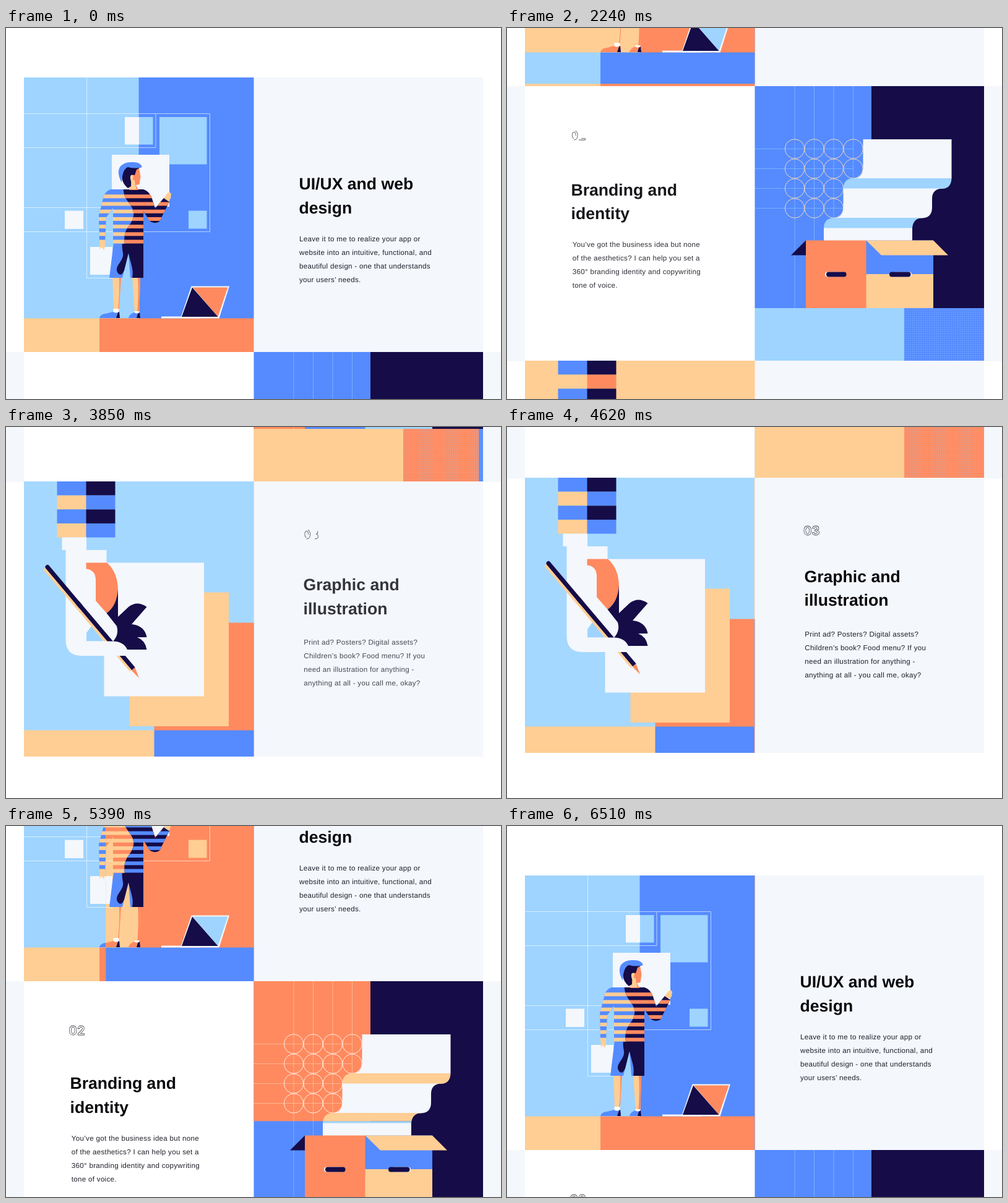
Write an HTML page with a canvas that moves like this. It is 800 px wide and 600 px high and loops after 6580 ms.

```html
<!DOCTYPE html>
<html lang="en">
<head>
<meta charset="utf-8">
<title>Services</title>
<style>
  html, body { margin: 0; height: 100%; overflow: hidden; background: #fff; }
  canvas { display: block; }
</style>
</head>
<body>
<canvas id="stage" width="800" height="600"></canvas>
<script>
const ctx = document.getElementById('stage').getContext('2d');
const LOOP = 6580, STEP = 70, PANEL_H = 444.2, HALF_W = 371;
const NAVY = '#150c48', PAPER = '#f4f7fc', SKY = '#9ed4ff', BLUE = '#558bff', PEACH = '#ffce94', ORANGE = '#ff8a5f';

// ---------- timing ----------
const clamp = v => Math.min(1, Math.max(0, v));
const span = (t, start, length) => clamp((t - start) / length);

function expo(u) {
  if (u <= 0 || u >= 1) return clamp(u);
  return u < .5 ? 2 ** (20 * u - 10) / 2 : 1 - 2 ** (10 - 20 * u) / 2;
}

// Cubic bezier (x1, 0, x2, 1), solved by bisection.
function bezier(u, x1 = .467, x2 = .128) {
  let low = 0, high = 1, s = .5;
  for (let i = 0; i < 24; i++) {
    s = (low + high) / 2;
    const r = 1 - s;
    if (3 * r * r * s * x1 + 3 * r * s * s * x2 + s ** 3 < u) low = s; else high = s;
  }
  return s * s * (3 - 2 * s);
}

// ---------- drawing helpers ----------
function rect(color, x1, y1, x2, y2) {
  ctx.fillStyle = color;
  ctx.fillRect(x1, y1, x2 - x1, y2 - y1);
}
function shape(color, d) {
  ctx.fillStyle = color;
  ctx.fill(new Path2D(d));
}
function line(color, d, width = 1) {
  ctx.strokeStyle = color;
  ctx.lineWidth = width;
  ctx.stroke(new Path2D(d));
}
function clipped(path, draw) {
  ctx.save();
  ctx.clip(path);
  draw();
  ctx.restore();
}
function palette(swapped) {
  return swapped
    ? { sky: PEACH, peach: SKY, blue: ORANGE, orange: BLUE }
    : { sky: SKY, peach: PEACH, blue: BLUE, orange: ORANGE };
}

// ---------- illustrations ----------
function drawDesigner(swapped) {
  const c = palette(swapped);
  rect(c.sky, 29, 80, 215, 470);
  rect(c.blue, 214.5, 80, 400.5, 470);
  rect(c.peach, 29, 469.5, 151, 525);
  rect(c.orange, 151, 469.5, 400.5, 525);

  rect(PAPER, 192, 144, 215, 188.5);
  rect(c.sky, 215, 144, 237.5, 188.5);
  rect(c.sky, 248, 144, 324.5, 220.5);
  rect(c.sky, 295, 295.5, 324.5, 324.5);
  line('rgba(255,255,255,.6)', 'M130.5 80V404.5H175 M29 138.5H329.5V329.5H29 M29 193.5H242V138.5 M29 290.5H172');
  rect(PAPER, 95, 295.5, 125, 325);
  rect(PAPER, 171, 205, 264, 289);
  rect(PAPER, 136, 354, 172, 399);

  // legs and shoes
  shape(PEACH, 'M172 402H186L182.500 457H174Z M204 402H217L215.500 462H208Z');
  shape(ORANGE, 'M183 402H186L182.500 457H181Q184 430 183 402Z M213 402H217L215.500 462H212Q215 430 213 402Z');
  rect('#fff', 173.5, 454, 182.5, 461);
  rect('#fff', 207.5, 458, 215.5, 462);
  shape(c.blue, 'M151 469Q152 463 161 462L173 459Q178 462 183 459L184 469Z M198 469Q199 463 207 460Q212 463 216 460L217 469Z');
  shape(NAVY, 'M181 460L183 459L184 469H178Z M213 462L216 460L217 469H211Z');

  // shorts
  shape(BLUE, 'M174 347H222V404H201L198 364L188 404H167Z');
  shape(NAVY, 'M188 347H222V404H204C207 390 201 380 198 364L191 392Q186 404 180 395C175 384 191 377 189 364Q187 354 188 347Z');

  // striped shirt
  shape(PEACH, 'M151 343H160V353L158 359L155 354L152 358Z');
  const shirt = new Path2D('M170 261H222Q232 264 236 276L241 292L255 275L264 281L248 313Q239 318 232 312L222 296V349H173V291L162 306L160 345H151L150 303L158 272Q162 262 170 261Z');
  const rightSide = new Path2D('M190 258C188 280 209 286 206 304C203 322 188 322 192 350H275V258Z');
  const stripes = (base, band) => {
    rect(base, 145, 258, 270, 350);
    for (let y = 342.5; y > 260; y -= 12.2) rect(band, 145, y, 270, y + 6);
  };
  clipped(shirt, () => {
    stripes(c.blue, PEACH);
    clipped(rightSide, () => stripes(NAVY, c.orange));
  });
  shape(PEACH, 'M255 275L260 268L264 265L267 268L266 276L262 280Z');

  // head
  shape(ORANGE, 'M206 226H215L217.500 240L215.500 253L210 254L214 262H199Z');
  shape(PEACH, 'M201 246H208L209 254L211 261H200Z');
  shape(NAVY, 'M187 225H218L211 229L208 238Q200 236 201 243Q203 249 202 256L197 259Q188 252 187 240Z');
  shape(PEACH, 'M202 238H206L205 247H203Q200 243 202 238Z');
  shape(c.blue, 'M185 246Q179 233 184 225Q191 216 204 217Q217 216 220 225Q209 228 197 225Q188 228 187 250Z');

  // laptop
  rect(PAPER, 251, 466.5, 314, 469.5);
  shape(PAPER, 'M299.500 417.500H361L344.500 469.500H282Z');
  shape(swapped ? SKY : ORANGE, 'M302 419.500H358.500L342.500 467Z');
  shape(NAVY, 'M301 419.500L342.500 467H284Z');
}

function drawBoxes(swapped) {
  const c = palette(swapped);
  const inside = swapped ? NAVY : BLUE;
  rect(c.blue, 400.5, 94, 590, 453);
  rect(NAVY, 589, 94, 771, 453);
  rect(c.sky, 400.5, 453, 642, 539);
  rect(c.blue, 642, 453, 771, 539);
  ctx.setLineDash([1, 2]);
  for (let y = 454.5; y < 538; y += 3) line('rgba(158,212,255,.7)', `M643 ${y}H771`);
  ctx.setLineDash([]);

  const rule = swapped ? 'rgba(255,225,190,.5)' : 'rgba(158,212,255,.5)';
  const ring = swapped ? '#fff0e2' : '#f0d5b8';
  for (let i = 0; i < 4; i++) {
    line(rule, `M${465 + 31.5 * i} 94V453 M400 ${195.5 + 32 * i}H559.500`);
    for (let j = 0; j < 4; j++) {
      ctx.beginPath();
      ctx.arc(465 + 31.5 * i, 195.5 + 32 * j, 15.7, 0, 7);
      ctx.strokeStyle = ring;
      ctx.stroke();
    }
  }

  // paper stack
  shape(PAPER, 'M575.500 180H718.500V243.500H558Q575.500 243 575.500 226Z');
  shape(c.sky, 'M560 243H718.500Q718 259.500 703 260H543.500Q544 243 560 243Z');
  shape(PAPER, 'M543.500 259.500H704Q687 260 687 276V290Q687 307 671 307.500H527Q543.500 307 543.500 290Z');
  shape(c.sky, 'M528 307H671Q656 308 655 324H512Q512 308 528 307Z');
  rect(PAPER, 512, 323.5, 655, 344);

  // box
  rect(c.orange, 483, 343.5, 581, 453);
  rect(inside, 580.5, 343.5, 689, 398);
  rect(c.peach, 580.5, 398, 689, 453);
  shape(c.peach, 'M580.500 343.500H689L713 367.500H605Z');
  shape(NAVY, 'M483 343.500V367.500H459Z');
  const pill = (color, x, width) => {
    ctx.beginPath();
    ctx.roundRect(x, 394.5, width, 8, 4);
    ctx.fillStyle = color;
    ctx.fill();
  };
  pill(PAPER, 514, 30);
  pill(NAVY, 516, 32.5);
  pill(PAPER, 624, 30);
  pill(NAVY, 618, 34.5);
}

function drawHand(swapped) {
  const c = palette(swapped);
  rect(swapped ? PEACH : '#a5d8ff', 29, 88, 400.5, 491);
  rect(c.orange, 239.5, 316.5, 400.5, 491);
  rect(c.peach, 199.5, 267.5, 360, 484);
  rect(PAPER, 158.5, 219.5, 320, 435.5);
  rect(c.peach, 29, 490.5, 240, 533);
  rect(c.blue, 239.5, 490.5, 400.5, 533);

  for (let i = 0; i < 4; i++) {
    const y = 88 + i * 22.65;
    rect(i % 2 ? PEACH : BLUE, 82.5, y, 130, y + 22.65);
    rect(i % 2 ? c.blue : NAVY, 129.5, y, 176.5, y + 22.65);
  }

  shape(PAPER, 'M90.500 178.500H130V199H162.500V300L172 346V370H122Q97 370 96.500 345V199H90.500Z');
  shape(c.sky, 'M130 346.500V333L138 322L158 346.500Z');
  shape(c.orange, 'M129.500 219.500H163Q181 235 181 265Q179 290 162.500 301L145 281V246Q144 231 129.500 229.500Z');
  shape(NAVY, 'M181 262V307L198 291Q212 280 227.500 291L203 319Q224 321 227.500 340H212Q225 345 227.500 360H194Q185 347 173 346.500Q183 336 179 322L162.500 301Q179 290 181 262Z');

  // pencil
  line(PEACH, 'M62 229L202 394', 5);
  ctx.lineCap = 'round';
  line(NAVY, 'M67 226.500L120 289.500', 7);
  ctx.lineCap = 'butt';
  line(NAVY, 'M115 283.500L206 391', 7);
  shape(ORANGE, 'M203 394L208.500 389L215 406Z');

  shape(PAPER, 'M120 346.500H172Q190 346.500 196 360V370H120Z');
}

// ---------- page ----------
const panels = [
  { draw: drawDesigner, ref: 80, number: '01', numberX: 473, numberY: 94.5,
    headX: 473.5, headY: 181, bodyX: 474, bodyY: 265.3,
    head: ['UI/UX and web', 'design'],
    body: ['Leave it to me to realize your app or', 'website into an intuitive, functional, and', 'beautiful design - one that understands', 'your users’ needs.'] },
  { draw: drawBoxes, ref: 94, number: '02', numberX: 101.5, numberY: 86.5,
    headX: 103.5, headY: 174, bodyX: 105.8, bodyY: 257.5,
    head: ['Branding and', 'identity'],
    body: ['You’ve got the business idea but none', 'of the aesthetics? I can help you set a', '360° branding identity and copywriting', 'tone of voice.'] },
  { draw: drawHand, ref: 88, number: '03', numberX: 479, numberY: 92.5,
    headX: 480.5, headY: 168.5, bodyX: 481.3, bodyY: 256.5, startsSwapped: true,
    head: ['Graphic and', 'illustration'],
    body: ['Print ad? Posters? Digital assets?', 'Children’s book? Food menu? If you', 'need an illustration for anything -', 'anything at all - you call me, okay?'] }
];

function drawText(panel, reveal, numberProgress) {
  const rest = (1 - reveal) ** 3;
  ctx.save();
  ctx.textRendering = 'geometricPrecision';
  ctx.globalAlpha = clamp(1 - 1.5 * rest);
  ctx.translate(0, 60 * rest);
  ctx.fillStyle = '#08080c';
  ctx.font = 'bold 26.6px "Liberation Sans", Arial, sans-serif';
  panel.head.forEach((text, i) => ctx.fillText(text, panel.headX, panel.headY + i * 38.7));
  ctx.fillStyle = '#20202a';
  ctx.font = '11.6px "Liberation Sans", Arial, sans-serif';
  ctx.letterSpacing = '0.29px';
  panel.body.forEach((text, i) => ctx.fillText(text, panel.bodyX, panel.bodyY + i * 22));
  ctx.restore();

  if (numberProgress <= 0) return;
  ctx.save();
  ctx.font = 'bold 20px Inter, sans-serif';
  ctx.strokeStyle = '#4a4a55';
  ctx.lineWidth = .8;
  ctx.lineJoin = 'round';
  if (numberProgress < 1) ctx.setLineDash([70 * numberProgress, 70]);
  ctx.strokeText(panel.number, panel.numberX, panel.numberY);
  ctx.restore();
}

function drawArt(panel, x, width, height) {
  ctx.save();
  ctx.translate(0, -panel.ref);
  panel.draw(!!panel.startsSwapped);
  if (width > 0 && height > 0) {
    const area = new Path2D();
    area.rect(x, panel.ref, width, height + (height >= PANEL_H ? 1 : 0));
    clipped(area, () => panel.draw(!panel.startsSwapped));
  }
  ctx.restore();
}

function render(t) {
  const first = expo(span(t, 770, 2100));
  const second = bezier(span(t, 2940, 1137), .467, .065);
  const back = bezier(span(t, 4550, 1960));
  const scroll = PANEL_H * (first + second) * (1 - back);

  // Each panel is recoloured by its own wipe, which runs off again on the way back.
  const down1 = expo(span(t, 1191, 1328));
  const back1 = bezier(span(t, 5020, 1217));
  const back2 = bezier(span(t, 5020, 1072));
  const across3 = bezier(span(t, 2940, 910));
  const back3 = bezier(span(t, 4550, 1563));
  const wipes = [
    [29 + HALF_W * back1, HALF_W * (1 - back1) + 1, back1 < 1 ? PANEL_H * down1 : 0],
    [400, HALF_W * second, PANEL_H * (1 - back2)],
    [29, (HALF_W + 1) * across3 * (1 - back3), PANEL_H]
  ];
  const reveals = [1, span(t, 1718, 800), span(t, 3450, 800)];
  const numbers = [t < 2800 ? span(t, 0, 700) : 0, span(t, 2030, 770), span(t, 3640, 770)];

  rect('#fff', 0, 0, 800, 600);
  panels.forEach((panel, i) => {
    const top = Math.round(80 + PANEL_H * i - scroll);
    if (top > 600 || top + PANEL_H < 0) return;
    ctx.save();
    ctx.translate(0, top);
    const frame = new Path2D();
    frame.rect(0, 0, 800, Math.ceil(PANEL_H));
    ctx.clip(frame);
    if (i === 1) {
      rect(PAPER, 0, 0, 800, PANEL_H + 1);
      rect('#fff', 29, 0, 400.5, PANEL_H + 1);
    } else {
      rect(PAPER, 400, 0, 771, PANEL_H + 1);
    }
    drawArt(panel, ...wipes[i]);
    drawText(panel, reveals[i], numbers[i]);
    ctx.restore();
  });
}

const begin = performance.now();
function tick() {
  const t = (performance.now() - begin) % LOOP;
  render(Math.floor(t / STEP) * STEP);
  requestAnimationFrame(tick);
}
tick();
</script>
</body>
</html>
```
